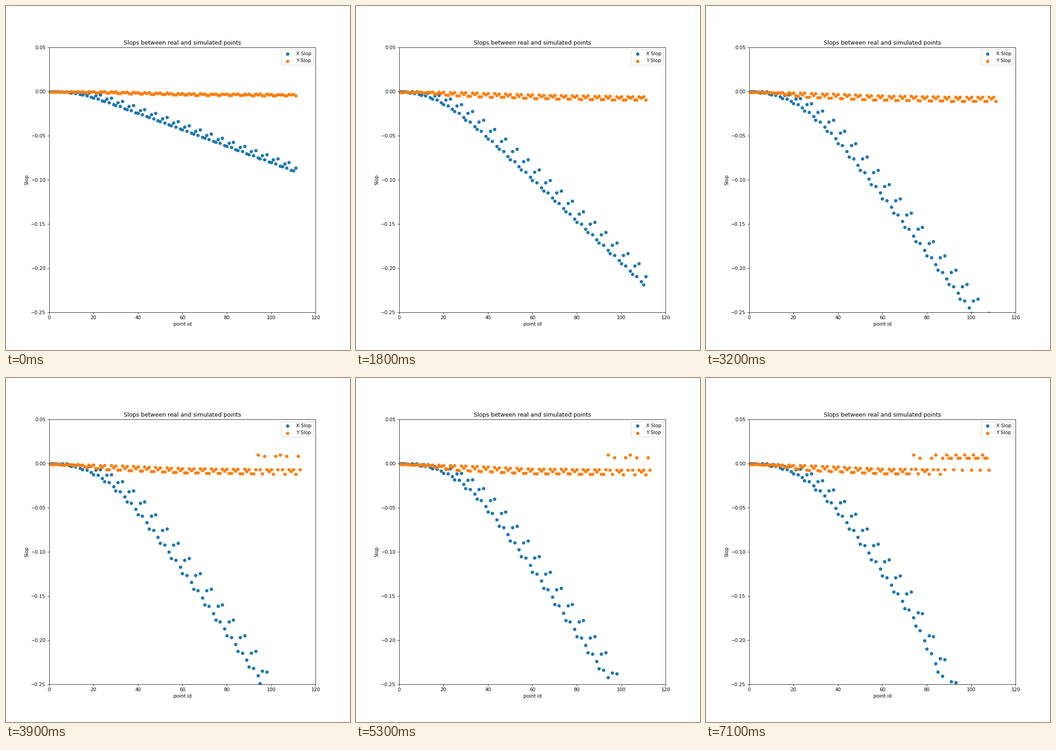
A matplotlib script that plays this animation: 748 by 748 pixels, repeating every 7.2 s.

```python
import numpy as np
import matplotlib.pyplot as plt
from matplotlib.animation import FuncAnimation

INCHES, DPI = 10, 74.8
FRAMES, INTERVAL = 72, 100
POINTS = 112

# Points come in rows of five; each column sits at its own place on the X curve.
SHIFT = np.array([0, -4.5, -0.5, -8, 0])
DRIFT = np.array([0, -1, -1, 0, -1.2])
BANDS = "abbac"  # upper, lower and middle band of Y by column

# Late phases: first frame, point count, then (first id, repeated Y motif).
PHASES = [
    (33, 114, [(94, "QabPacabPa")]),
    (44, 113, [(92, "PaQabPacab")]),
    (51, 114, [(94, "QabPacabPa")]),
    (57, 108, [(88, "QbPacbPa")]),
    (66, 109, [(74, "QabPacabPa"), (89, "QPPa")]),
]


def phase_at(frame):
    """Point count and Y motifs in force at a frame."""
    count, motifs = POINTS, []
    for start, n, parts in PHASES:
        if frame >= start:
            count, motifs = n, parts
    return count, motifs


def x_slops(ids, frame, motifs):
    """A softened ramp that steepens and starts later as time goes on."""
    slope = np.interp(frame, [0, 10, 26, 39, 60], [0.93, 1.71, 3.02, 3.53, 3.72])
    onset = np.interp(frame, [10, 26, 39, 60, 71], [13, 20.5, 24.3, 27, 25.5])
    soft = np.interp(frame, [0, 26], [5, 8.5])

    def ramp(pos):
        return slope * soft * np.logaddexp(0, (pos - onset) / soft)

    shift = SHIFT + DRIFT * min(frame / 40, 1)
    pos = ids + shift[ids % 5]
    if motifs:
        # Past the split the rows run ahead of their ids.
        pos += 0.4 * np.maximum(0, ids - motifs[0][0])
    return ramp(0) - ramp(np.maximum(pos, 0))


def y_letters(count, motifs):
    letters = (BANDS * count)[:count]
    for start, motif in motifs:
        letters = letters[:start] + (motif * count)[:count - start]
    return letters


def y_slops(ids, frame, motifs):
    """Bands that sink and spread, plus two levels above zero in late phases."""
    grow = min(frame / 45, 1)
    fast = grow ** 0.5
    upper = -np.interp(ids, [0, 25, 60, 100],
                       [0.6, 2.4 * grow, 2.3 + 3.9 * grow, 3 + 4.3 * fast])
    spread = (1.7 + 3.4 * fast) * np.clip((ids - 8) / 17, 0.1, 1)
    high = 8 - 0.09 * np.clip(frame - 39, 0, 22)
    levels = {
        "a": upper,
        "b": upper - spread,
        "c": upper - 0.45 * spread,
        "P": np.full(len(ids), high),
        "Q": np.full(len(ids), 9.8),
    }
    return np.array([levels[c][i] for i, c in enumerate(y_letters(len(ids), motifs))])


def points(frame):
    count, motifs = phase_at(frame)
    ids = np.arange(count)
    return [np.column_stack([ids, rule(ids, frame, motifs) / 1000])
            for rule in (x_slops, y_slops)]


fig, ax = plt.subplots(figsize=(INCHES, INCHES), dpi=DPI)
ax.set_xlim(0, 120)
ax.set_ylim(-0.25, 0.05)
ax.set_title("Slops between real and simulated points")
ax.set_xlabel("point id")
ax.set_ylabel("Slop")
dots = [ax.scatter(*data.T, label=name)
        for data, name in zip(points(0), ("X Slop", "Y Slop"))]
ax.legend(loc="upper right")


def update(frame):
    for dot, data in zip(dots, points(frame)):
        dot.set_offsets(data)
    return dots


anim = FuncAnimation(fig, update, frames=FRAMES, interval=INTERVAL,
                     repeat=True, repeat_delay=0, blit=False)
plt.show()
```
